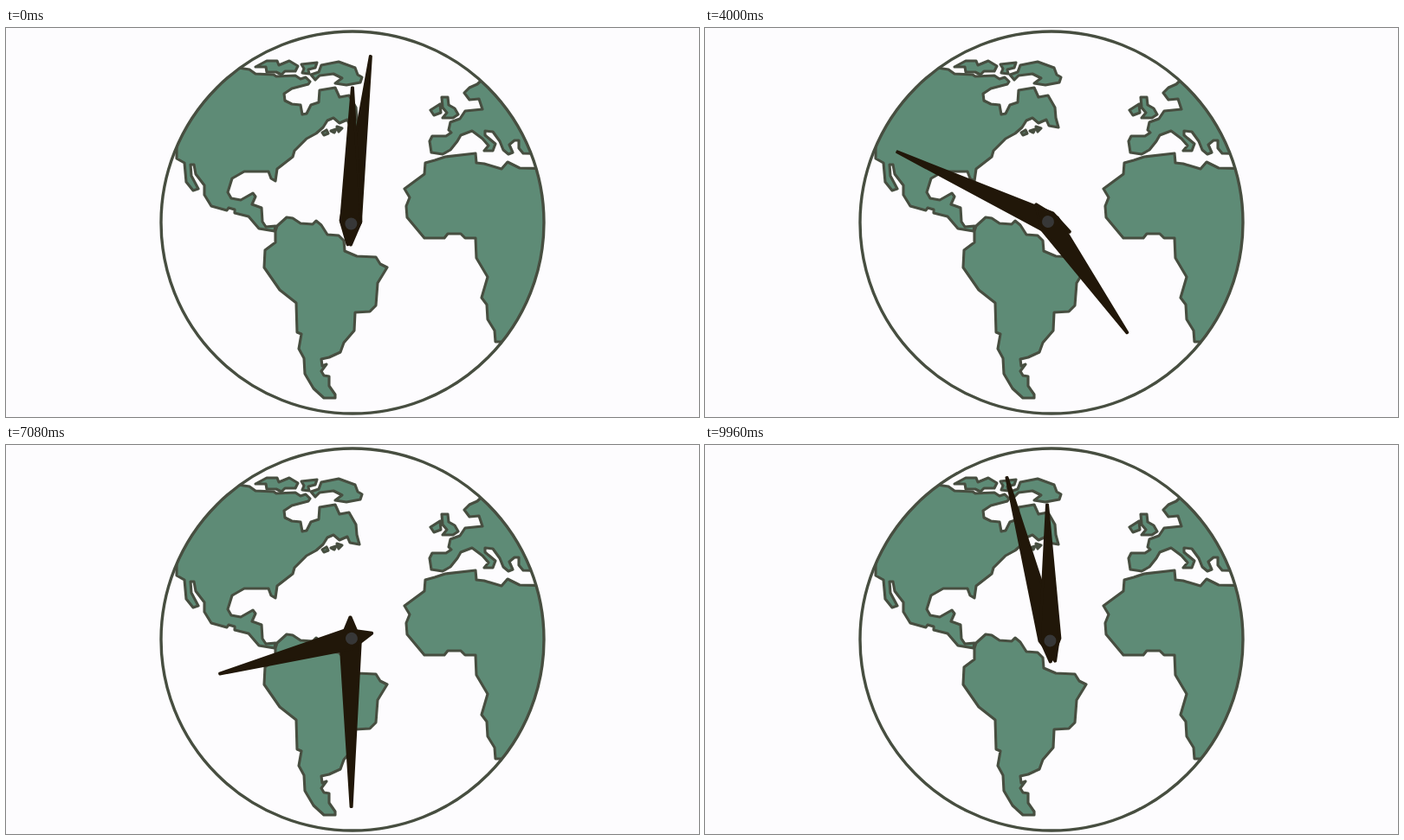
An HTML page for the animation above (10 s loop, 800 by 450 pixels).

```html
<!DOCTYPE html>
<html lang="en">
<head>
<meta charset="utf-8">
<title>Globe clock</title>
<style>
  html, body { margin: 0; width: 100%; height: 100%; overflow: hidden; background: #fdfcfe; }
  svg { display: block; width: 100%; height: 100%; }
  .line { stroke: #474e40; stroke-width: 3.4; stroke-linejoin: round; }
  .land { fill: #5e8b76; stroke-width: 3.1; }
  .hand { fill: #211709; stroke: #211709; stroke-width: 3; stroke-linejoin: round; }
</style>
</head>
<body>
<svg viewBox="0 0 800 450">
  <clipPath id="disc"><circle cx="400" cy="225" r="221"/></clipPath>
  <g class="line land" clip-path="url(#disc)">
    <!-- North and Central America -->
    <path d="M197 151L197 138 180 130 250 40 268 46 281 48 288 53 309 54 312 56 334 55 340 59 346 57 351 62 349 65
      330 70 321 76 322 84 330 88 340 89 342 100 347 99 352 89 361 86 362 72 380 69 385 80 396 78 404 92 405 104
      408 115 397 113 394 106 385 110 378 104 371 107 366 115 358 122 347 128 333 142 331 149 313 163 311 177
      306 174 303 166 275 166 261 174 256 190 260 197 271 199 285 191 288 195 284 204 295 208 296 224 300 230
      311 229 310 235 292 232 280 218 264 214 264 210 257 208 255 211 237 206 229 193 229 182 219 169 217 158
      213 158 214 171 222 186 216 188 208 178 206 156Z"/>
    <!-- Arctic islands -->
    <path d="M288 45L301 38 313 38 315 43 327 38 337 44 334 50 322 50 318 54 312 51 301 51 300 45Z"/>
    <path d="M341 42L359 40 357 46 349 48 350 53 342 52 344 47Z"/>
    <path d="M364 43L384 39 403 46 406 54 411 57 409 63 393 66 380 64 388 58 378 53 362 55 357 60 352 54 361 51Z"/>
    <path d="M365 121L370 118 372 122 367 124ZM375 119L381 117 379 121ZM382 114L388 116 384 120Z"/>
    <!-- South America -->
    <path d="M311 235L313 229 324 219 331 220 340 226 354 227 358 223 364 228 371 239 384 240 390 246 391 258
      405 264 427 265 432 273 440 277 429 295 427 321 420 328 403 329 402 350 390 364 386 375 373 381 364 383
      365 391 370 389 364 397 367 402 373 403 373 414 380 424 380 428 367 428 355 417 345 400 344 382 338 371
      341 354 336 352 335 318 316 303 298 277 299 257 311 248Z"/>
    <!-- Africa -->
    <path d="M640 163L593 162 579 155 572 163 552 157 543 156 542 145 507 149 495 153 484 156 483 169 460 186
      466 196 462 206 463 219 483 243 506 243 510 238 525 238 530 243 542 243 543 266 556 288 549 312 555 320
      556 337 564 350 565 363 640 363Z"/>
    <!-- Europe -->
    <path d="M560 50L544 65 535 69 529 75 535 83 546 82 550 94 530 96 524 105 513 109 511 118 514 121 508 125
      492 125 489 131 491 144 504 146 513 141 521 131 525 124 538 119 550 128 557 136 552 142 562 142 565 134
      553 124 553 119 562 120 570 131 574 141 580 146 585 144 581 135 587 130 592 130 592 139 597 145 640 146Z"/>
    <path d="M503 80L510 80 511 89 518 93 522 100 516 104 504 104 509 98 504 92ZM490 95L501 88 502 98 494 101Z"/>
  </g>
  <circle class="line" cx="400" cy="225" r="221" fill="none"/>
  <g transform="translate(397.6 224.9)">
    <path id="minute" class="hand" d="M-.5-193.7L.5-193.7 11.7-1 .4 26-.4 26-11.7-1Z"/>
    <g id="hour">
      <path class="hand" d="M.2-156L1.2-156 12.3-1 1 26 .2 26-11.1-1Z"/>
      <circle cx=".8" cy="1.6" r="7" fill="#373737"/>
    </g>
  </g>
</svg>
<script>
  const LOOP = 10000, STEP = 40, TICKS = 600;
  const minute = document.getElementById('minute');
  const hour = document.getElementById('hour');
  const turn = (el, deg) => el.setAttribute('transform', `rotate(${deg % 360})`);

  // The hands advance on a 60 Hz tick, shown 25 times a second.
  function draw(now) {
    const shown = Math.floor((now % LOOP) / STEP) * STEP;
    const tick = Math.floor(shown * TICKS / LOOP) + 1;
    turn(hour, tick * 360 / TICKS);
    turn(minute, tick * 12 * 360 / TICKS - 0.3);
  }

  const start = performance.now();
  function loop() {
    draw(performance.now() - start);
    requestAnimationFrame(loop);
  }
  loop();
</script>
</body>
</html>
```
